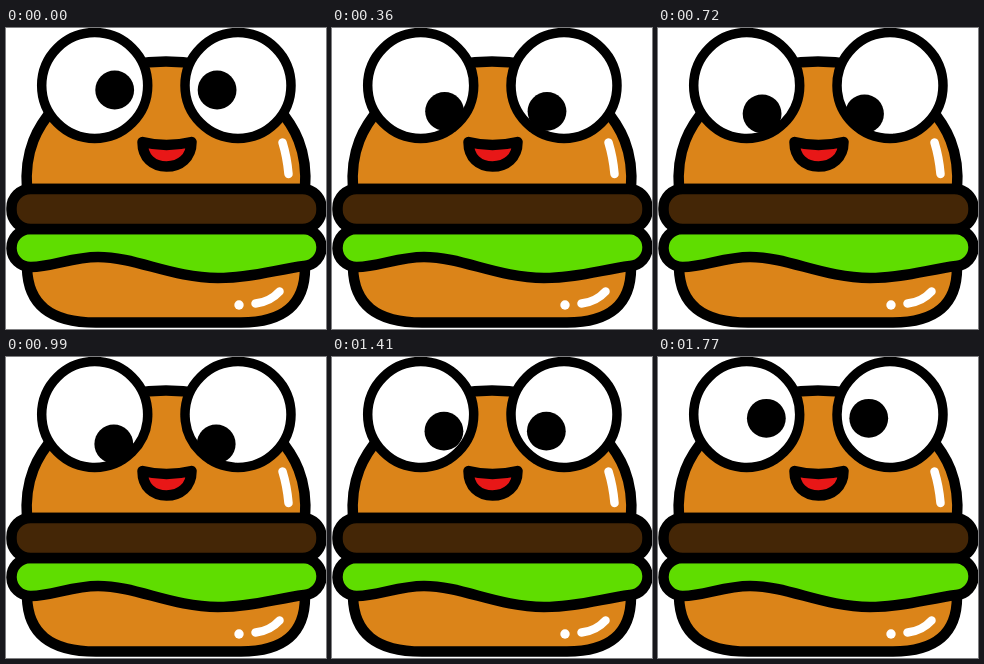
These frames come from a looping animation (320x301 px, 1800 ms). An HTML page:

```html
<!DOCTYPE html>
<html lang="en">
<head>
<meta charset="utf-8">
<title>Burger rolling its eyes</title>
<style>
  html, body { margin: 0; width: 100%; height: 100%; overflow: hidden; background: #fff; }
  svg { display: block; width: 320px; height: 301px; }
  .ink { stroke: #000; stroke-width: 10.5; stroke-linejoin: round; }
  .bun { fill: #db8419; }
  .patty { fill: #442606; }
  .lettuce { fill: #5fdd00; }
  .mouth { fill: #e81717; }
  .eye { fill: #fff; stroke-width: 9.5; }
  .shine { fill: none; stroke: #fff; stroke-width: 8.5; stroke-linecap: round; }
</style>
</head>
<body>
<svg viewBox="0 0 320 301">
  <path class="ink bun" d="M21 215 V240 C22 276 44 294.500 90 294.500 H235 C278 294.500 299 276 299 240 V215 Z"/>
  <path class="ink lettuce" d="M24 201 H296 A18.500 18.500 0 0 1 298 238 C268 242 246 250 212 250 C166 250 130 229 92 229 C66 229 46 239 25 239 A19 19 0 0 1 24 201 Z"/>
  <path class="ink bun" d="M21 161 C18 122 32 98 48 80 C78 47 118 33.500 160 33.500 C202 33.500 242 47 272 80 C288 98 302 122 299 161 Z"/>
  <rect class="ink patty" x="5.500" y="161" width="310" height="40" rx="19"/>
  <path class="shine" d="M276.500 114.500 Q281 129 282.500 146"/>
  <path class="shine" d="M249.500 275.500 Q264 274 273.500 263.500"/>
  <circle cx="233" cy="277" r="4.700" fill="#fff"/>
  <path class="ink mouth" d="M136.500 114 Q160 120 185.500 114 C185.500 130 174 138.500 160.500 138.500 C147 138.500 136.500 130 136.500 114 Z"/>
  <circle class="ink eye" cx="88.700" cy="57.500" r="53"/>
  <circle class="ink eye" cx="232" cy="57.500" r="53"/>
  <g id="pupils">
    <circle r="19.400"/>
    <circle cx="102.400" r="19.400"/>
  </g>
</svg>
<script>
const LOOP = 1800, STEP = 30;
const pupils = document.getElementById('pupils');

// Key poses of the left pupil; the right one follows.
const keys = [
  { t: 0, x: 108.7, y: 62 },
  { t: 180, x: 116.5, y: 79.5 },
  { t: 510, x: 108, y: 84.3 },
  { t: 750, x: 104, y: 86 },
  { t: 990, x: 107.8, y: 87 },
  { t: 1230, x: 114.5, y: 87 },
  { t: 1530, x: 109.7, y: 66 }
];

function key(i) {
  const n = keys.length, turn = Math.floor(i / n);
  const k = keys[i - turn * n];
  return { ...k, t: k.t + turn * LOOP };
}

// Closed smooth curve through the keys.
function position(t, axis) {
  const i = keys.findLastIndex(k => k.t <= t);
  const [a, b, c, d] = [-1, 0, 1, 2].map(k => key(i + k));
  const span = c.t - b.t, u = (t - b.t) / span, v = 1 - u;
  const slope = (p, q) => (q[axis] - p[axis]) / (q.t - p.t) * span;
  return v * v * ((1 + 2 * u) * b[axis] + u * slope(a, c))
       + u * u * ((1 + 2 * v) * c[axis] - v * slope(b, d));
}

const start = performance.now();
function draw(now) {
  const t = Math.floor(Math.max(0, now - start) % LOOP / STEP) * STEP;
  pupils.setAttribute('transform', `translate(${position(t, 'x')} ${position(t, 'y')})`);
  requestAnimationFrame(draw);
}
draw(start);
</script>
</body>
</html>
```
